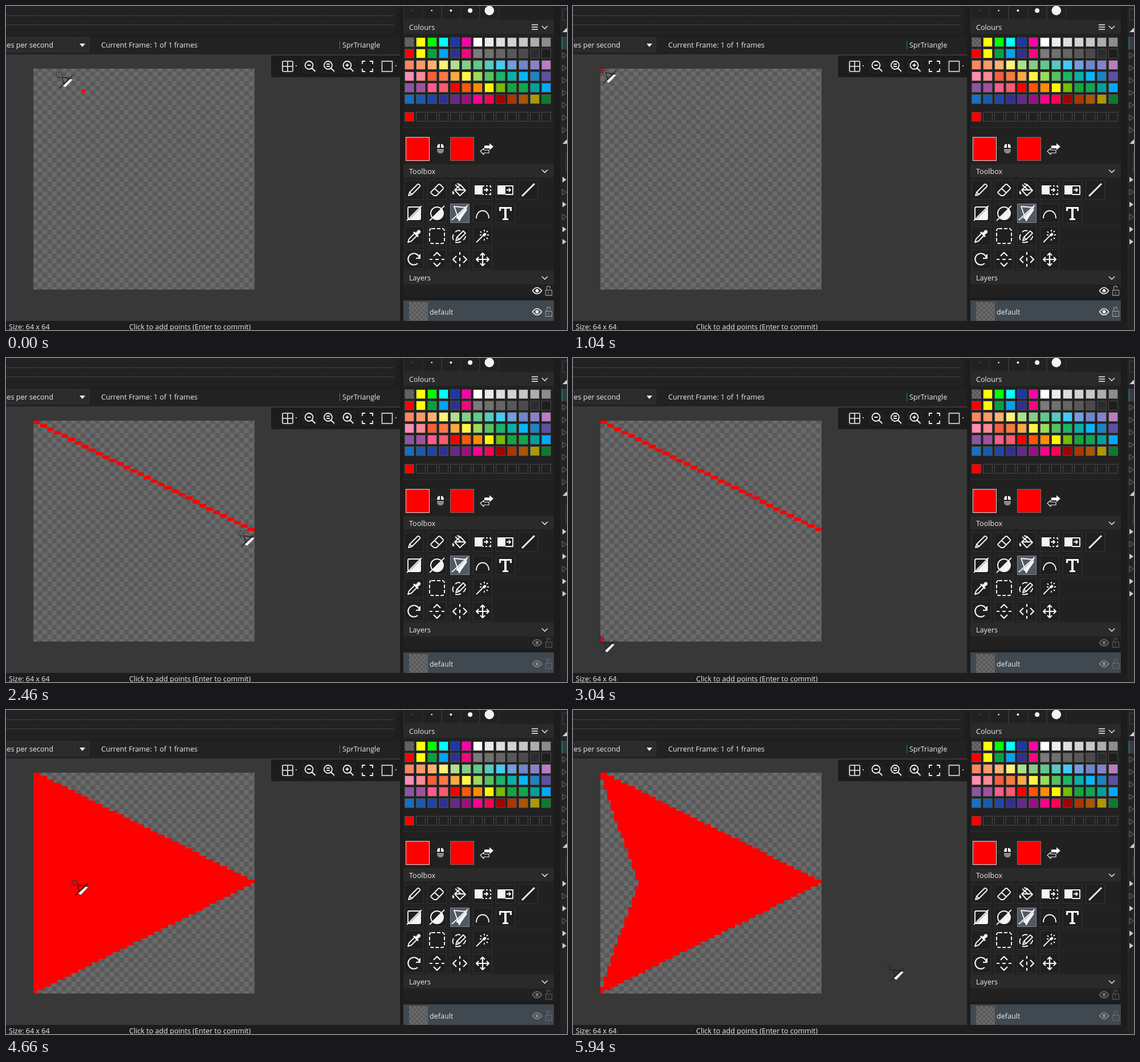
Write an HTML page with a canvas that moves like this. It is 984 px wide and 569 px high and loops after 5960 ms.

```html
<!DOCTYPE html>
<html lang="en">
<head>
<meta charset="utf-8">
<title>Sprite editor: polygon tool</title>
<style>
html, body { margin: 0; width: 100%; height: 100%; overflow: hidden; background: #1c1c1c; }
canvas { display: block; }
</style>
</head>
<body>
<canvas id="stage" width="984" height="569"></canvas>
<script>
const ctx = document.getElementById('stage').getContext('2d');
const LOOP = 5960, OX = 48, OY = 110, SIZE = 388, CELL = SIZE / 64;
const WHITE = '#f4f4f4';
const CLICKS = { first: 1250, second: 2300, third: 3350, fourth: 4960 };

// Pointer hotspot: time, x, y
const PATH = [
  [-100, 136, 149], [0, 93, 121], [260, 52, 113], [1300, 52, 113],
  [1740, 428, 300], [2400, 428, 300], [2900, 49, 495], [3920, 49, 495],
  [4500, 120, 303], [5060, 120, 303], [5760, 556, 452], [6000, 556, 452]
];

const PALETTE = `
  check ff0 0f0 0ff 1f35ad ff00a8 fff ebebeb dedede d2d2d2 c6c6c6 adadad 8c8c8c
  f00 ff0 00a43e 00a2f5 2e3192 ff0080 7b7b7b 707070 656565 585858 4a4a4a 2c2c2c 1d1d1d
  ff8562 fb9b65 fdb26b fff07d aee08a 83ce82 5fc988 52cbc0 40ccf5 6f9fe0 7084cf 8781cc b97dbd
  ff8db5 ff8896 ff5b38 ff7843 ffa93e fff63f 9adb5a 55c25b 19b665 00b4a8 00b8f5 1d83c6 5a52a5
  8a55a5 a350a0 ff5a8c ff5a70 f00 ff5500 ff8c00 fff700 6fbf00 12a73c 0aaa4a 00a19a 00a8ff
  1a6fc0 1a5aa8 1f45a8 2e3192 652a8c 9b1080 ff0090 ff0050 a00000 aa3500 aa5500 aa9a00 0f7a2f
`.trim().split(/\s+/);

// Each tool: column, row, stroked path, filled path
const TOOLS = [
  [0, 0, 'M-10 10L-8 4 6-10Q8-11 10-8Q11-7 10-6L-4 8ZM-8 4L-4 8'],
  [1, 0, 'M-10 3L2-9Q4-11 6-9L10-5Q12-3 10-1L-1 10H-5L-10 6Q-12 4-10 3ZM-5-3L4 5'],
  [2, 0, 'M-9 0L1-9 10 1 0 10ZM-9 0H9M1-9L-5-11M-8-9L3 1', 'M-12 1Q-15 7-11 8Q-8 7-12 1'],
  [3, 0, 'M0-7H3M6-7H9M12-7H14V-4M14-1V2M14 5V8H11M8 8H5M2 8H0M2 0H9M6-3L9 0 6 3', 'M-14-8H0V8H-14Z'],
  [4, 0, 'M0-7H13V8H0M2 0H9M6-3L9 0 6 3', 'M-14-8H0V8H-14Z'],
  [5, 0, 'M-11 11L11-11'],
  [0, 1, 'M-11 9V-9Q-11-11-9-11H9Q11-11 11-9V9Q11 11 9 11H-9Q-11 11-11 9ZM-13 13L13-13', 'M11-9V11H-9Z'],
  [1, 1, 'M-11 0A11 11 0 1 1 11 0A11 11 0 1 1-11 0M-13 13L13-13', 'M8-8A11 11 0 0 1-8 8Z'],
  [2, 1, 'M-10-12L12-10-1 13ZM-14 12L14-14', 'M9-8L13-6 0 12-7 8Z'],
  [3, 1, 'M-11 9C-11-9 11-9 11 9'],
  [4, 1, '', 'M-11-11H11V-4H8V-8H2V9H5V12H-5V9H-2V-8H-8V-4H-11Z'],
  [0, 2, 'M-11 11L-9 5 1-5 5-1-5 9Z', 'M0-8L3-6 6-10Q9-12 11-9Q12-7 10-5L6-2 8 0 6 2-2-6Z'],
  [2, 2, 'M-7 8L-5 2 6-9 10-5-1 6ZM-5 2L-1 6M1-9Q-4-11-8-7M-11-3Q-14 3-11 7M-8 11Q-3 12 2 10M6 7Q10 4 10 0'],
  [3, 2, 'M-11 11L3-3M3-11V-8M-4-8L-2-6M-5-2H-2M9-9L7-7M8-2H11M7 3L9 5M3 5V8', 'M0-3L4-6 7-3 3 1Z'],
  [0, 3, 'M6 7A10 10 0 1 1 9-3M10-9V-2H3'],
  [1, 3, 'M-13 0H-8M-3 0H3M8 0H13M-6-6L0-12 6-6M-6 6L0 12 6 6'],
  [2, 3, 'M0-13V-8M0-3V3M0 8V13M-6-6L-12 0-6 6M6-6L12 0 6 6'],
  [3, 3, 'M-11 0H11M0-11V11M-4-7L0-11 4-7M-4 7L0 11 4 7M-7-4L-11 0-7 4M7-4L11 0 7 4']
];

const tile = document.createElement('canvas');
tile.width = tile.height = 16;
const tileCtx = tile.getContext('2d');
tileCtx.fillStyle = '#6a6a6a';
tileCtx.fillRect(0, 0, 16, 16);
tileCtx.fillStyle = '#595959';
tileCtx.fillRect(8, 0, 8, 8);
tileCtx.fillRect(0, 8, 8, 8);
const checks = ctx.createPattern(tile, 'repeat');

function box(x, y, w, h, fill) {
  ctx.fillStyle = fill;
  ctx.fillRect(x, y, w, h);
}

function frame(x, y, w, h, color) {
  ctx.strokeStyle = color;
  ctx.lineWidth = 1;
  ctx.strokeRect(x + .5, y + .5, w - 1, h - 1);
}

// dx, dy: how far the pattern starts outside the box
function checker(x, y, w, h, scale, dx = 0, dy = 0) {
  ctx.save();
  ctx.translate(x - dx, y - dy);
  ctx.scale(scale, scale);
  box(dx / scale, dy / scale, w / scale, h / scale, checks);
  ctx.restore();
}

function text(str, x, y, align = 'left') {
  ctx.font = '12.6px "Open Sans", "Noto Sans", sans-serif';
  ctx.textAlign = align;
  ctx.fillStyle = '#ececec';
  ctx.fillText(str, x, y);
}

function icon(x, y, line, solid = '', width = 2, color = WHITE) {
  ctx.save();
  ctx.translate(x, y);
  ctx.strokeStyle = ctx.fillStyle = color;
  ctx.lineWidth = width;
  ctx.lineJoin = 'round';
  if (line) ctx.stroke(new Path2D(line));
  if (solid) ctx.fill(new Path2D(solid));
  ctx.restore();
}

function dot(x, y, r) {
  ctx.fillStyle = WHITE;
  ctx.beginPath();
  ctx.arc(x, y, r, 0, 7);
  ctx.fill();
}

function header(label, y, h) {
  box(697, y, 264, h, '#2a2a2a');
  text(label, 707, y + h / 2 + 5);
  icon(945, y + h / 2, 'M-5-2L0 3 5-2', '', 1.4);
}

function drawTop() {
  box(0, 0, 691, 52, '#1f1f1f');
  box(0, 0, 684, 50, '#222');
  for (const y of [16, 32]) {
    box(0, y, 680, 2, '#343434');
    for (let x = 54; x < 680; x += 85) box(x, y - 5, 1, 5, '#303030');
  }
  box(0, 53, 691, 32, '#222');
  box(0, 55, 146, 26, '#2b2b2b');
  frame(-1, 55, 147, 26, '#363636');
  box(121, 56, 1, 24, '#363636');
  text('Frames per second', 83, 73, 'right');
  icon(134, 69, '', 'M-5-3H5L0 3Z');
  text('Current Frame: 1 of 1 frames', 167, 73);
  box(585, 61, 1, 15, '#079a68');
  text('SprTriangle', 590, 73);
}

function drawViewBar() {
  ctx.fillStyle = '#1c1c1c';
  ctx.beginPath();
  ctx.roundRect(465, 87, 226, 38, [3, 0, 0, 3]);
  ctx.fill();
  for (const x of [482, 521, 555, 588, 622, 656]) frame(x, 94, 24, 24, '#292929');
  icon(494, 106, 'M-9-7Q-9-9-7-9H7Q9-9 9-7V7Q9 9 7 9H-7Q-9 9-9 7ZM-9 0H9M0-9V9', '', 1.6);
  const signs = ['M-5-2H1', 'M-5-4H1M-5 0H1', 'M-5-2H1M-2-5V1'];
  signs.forEach((sign, i) =>
    icon(533.5 + i * 33.5, 106, 'M5-2A7 7 0 1 1-9-2A7 7 0 1 1 5-2M3 3L9 9' + sign, '', 1.8));
  icon(634, 106, 'M-9-4V-9H-4M4-9H9V-4M9 4V9H4M-4 9H-9V4', '', 1.8);
  icon(668.5, 106, 'M-9-9H9V9H-9Z', '', 1.4);
  dot(509, 105, 1);
  dot(684, 105, 1);
}

function drawColours() {
  [.6, 1.3, 2, 4, 8.3].forEach((r, i) => {
    frame(697 + i * 33.5 | 0, -10, 34, 34, '#333');
    dot(713 + i * 33.7, 8, r);
  });
  header('Colours', 25, 24);
  icon(928, 37, 'M-6-4H5M-6 0H5M-6 4H5', '', 1.6);
  PALETTE.forEach((color, i) => {
    const x = 699 + i % 13 * 20, y = 55 + Math.floor(i / 13) * 20;
    if (color === 'check') checker(x, y, 17, 17, .5);
    else box(x, y, 17, 17, '#' + color);
    frame(x, y, 17, 17, '#494949');
  });
  for (let i = 0; i < 13; i++) {
    if (!i) box(700, 187, 15, 15, '#f00');
    frame(699 + i * 20, 186, 17, 17, '#4b4b4b');
  }
  box(697, 213, 264, 1, '#2d2d2d');
  box(744, 248, 36, 1, '#3c3c3c');
  box(752, 241, 20, 20, '#212121');
  for (const x of [701, 779]) {
    box(x, 230, 42, 42, '#f00');
    frame(x, 230, 42, 42, x < 750 ? '#ddd' : '#707070');
  }
  icon(762, 250, '', 'M-6 1H6V4Q5 9 0 9Q-5 9-6 4Z', 1, '#8a8a8a');
  icon(762, 250, '', 'M-6-1Q-6-8-1-8V-1ZM1-1V-8Q6-8 6-1Z');
  icon(843, 250, 'M-11 5L-5 0V3H4V8H-5V11Z', 'M-4-5H5V-9L12-3 5 3V0H-4Z', 1.1);
}

function drawTools() {
  header('Toolbox', 278, 23);
  for (let r = 0; r < 4; r++) box(697, 343 + r * 40.6 | 0, 264, 1, '#292929');
  const place = (c, r) => [716 + c * 40, Math.round(323 + r * 40.6)];
  const button = (c, r) => {
    const [x, y] = place(c, r), active = c === 2 && r === 1;
    box(x - 17, y - 17, 34, 34, active ? '#515965' : '#1f1f1f');
    frame(x - 17, y - 17, 34, 34, active ? '#7e8997' : '#343434');
    return [x, y];
  };
  for (const [c, r, line, solid] of TOOLS) {
    const thick = c === 5 ? 3 : r === 3 ? 2.2 : 1.9;
    icon(...button(c, r), line, solid, thick);
  }
  const [x, y] = button(1, 2);
  ctx.save();
  ctx.setLineDash([6, 3]);
  ctx.lineWidth = 2;
  ctx.strokeStyle = WHITE;
  ctx.beginPath();
  ctx.roundRect(x - 13, y - 13, 26, 26, 4);
  ctx.stroke();
  ctx.restore();
}

function drawLayers(editing) {
  header('Layers', 465, 24);
  box(697, 511, 264, 6, '#1c1c1c');
  box(697, 517, 264, 36, '#404850');
  checker(707, 520, 33, 33, .5);
  text('default', 743, 542);
  for (const y of [500, 537]) {
    ctx.globalAlpha = editing ? .38 : 1;
    icon(931.5, y, 'M-8 0Q0-11 8 0Q0 11-8 0Z', 'M-3 0A3 3 0 1 1 3 0A3 3 0 1 1-3 0', 1.7);
    ctx.globalAlpha = editing ? .45 : 1;
    icon(951.5, y, 'M-5-1H6V8H-5ZM-3-1V-5Q-3-8 0-8Q3-8 3-5V-4M0 2V5', '', 1.3, '#929292');
    ctx.globalAlpha = 1;
  }
}

function drawSideTree() {
  box(973, 0, 11, 569, '#232323');
  box(973, 0, 1, 553, '#2c2c2c');
  frame(976, 5, 20, 21, '#444');
  box(974, 54, 10, 22, '#343b43');
  box(975, 54, 1, 22, '#079a68');
  for (const y of [42, 238]) icon(976, y, '', 'M0 4L8-4V4Z', 1, '#d0d0d0');
  for (let i = 0; i < 16; i++) {
    const y = 87 + i * 21.8;
    if (i > 6 && i < 10) continue;
    const solid = [10, 12, 14, 15].includes(i);
    const shape = 'M0-5L7 0 0 5Z';
    icon(976, y, solid ? '' : shape, solid ? shape : '', 1, solid ? '#ccc' : '#777');
  }
  box(982, 258, 1, 34, '#444');
}

function drawInterface(editing) {
  box(0, 0, 984, 569, '#1c1c1c');
  box(0, 85, 691, 468, '#383838');
  box(0, 85, 1, 468, '#2b3744');
  box(697, 0, 264, 553, '#212121');
  drawTop();
  drawViewBar();
  drawColours();
  drawTools();
  drawLayers(editing);
  drawSideTree();
  box(0, 553, 973, 16, '#1d1d1d');
  text('Size: 64 x 64', 5, 568);
  text('Click to add points (Enter to commit)', 216, 568);
  checker(OX, OY, SIZE, SIZE, 1.0525, 1.1, 3.4);
}

// Paints cells a..b of one sprite row
function run(row, a, b) {
  const y = Math.round(OY + row * CELL), x = Math.round(OX + a * CELL);
  box(x, y, Math.round(OX + (b + 1) * CELL) - x, Math.round(OY + (row + 1) * CELL) - y, '#f00');
}

function pointer(t) {
  const i = PATH.findIndex(key => key[0] > t);
  const [t0, x0, y0] = PATH[i - 1], [t1, x1, y1] = PATH[i];
  const p = (t - t0) / (t1 - t0), e = p * p * (3 - 2 * p);
  return [x0 + (x1 - x0) * e, y0 + (y1 - y0) * e];
}

function drawSprite(t) {
  if (t >= CLICKS.third) {
    for (let r = 0; r < 64; r++) {
      const right = r < 32 ? 2 * r + 1 : 2 * (63 - r);
      const notch = Math.floor(Math.min(r, 63 - r) * 11 / 31.5 + .4);
      run(r, t >= CLICKS.fourth ? Math.min(notch, right) : 0, right);
    }
  } else if (t >= CLICKS.second) {
    for (let r = 0; r < 32; r++) run(r, 2 * r, 2 * r + 1);
  } else if (t >= CLICKS.first) {
    run(0, 0, 0);
  }
  // The hovered cell trails the pointer slightly
  const [x, y] = pointer(t - 100);
  const col = Math.floor((x - OX) / CELL), row = Math.floor((y - OY) / CELL);
  if (col >= 0 && col < 64 && row >= 0 && row < 64) run(row, col, col);
}

function drawCursor(t) {
  const [x, y] = pointer(t).map(Math.round);
  icon(x, y, 'M0-6V-2M0 2V6M-6 0H-2M2 0H6M-4-4L-3-3M4-4L3-3M-4 4L-3 3', '', 1.2, '#202020');
  icon(x, y, 'M5 4L23 7 11 22ZM1 23L24 1', '', 1.3, '#202020');
  icon(x, y, '', 'M7 19L20 7 24 8 11 22Z');
}

function draw(now) {
  const t = now % LOOP;
  drawInterface(t >= CLICKS.first);
  drawSprite(t);
  drawCursor(t);
  requestAnimationFrame(draw);
}
requestAnimationFrame(draw);
</script>
</body>
</html>
```
